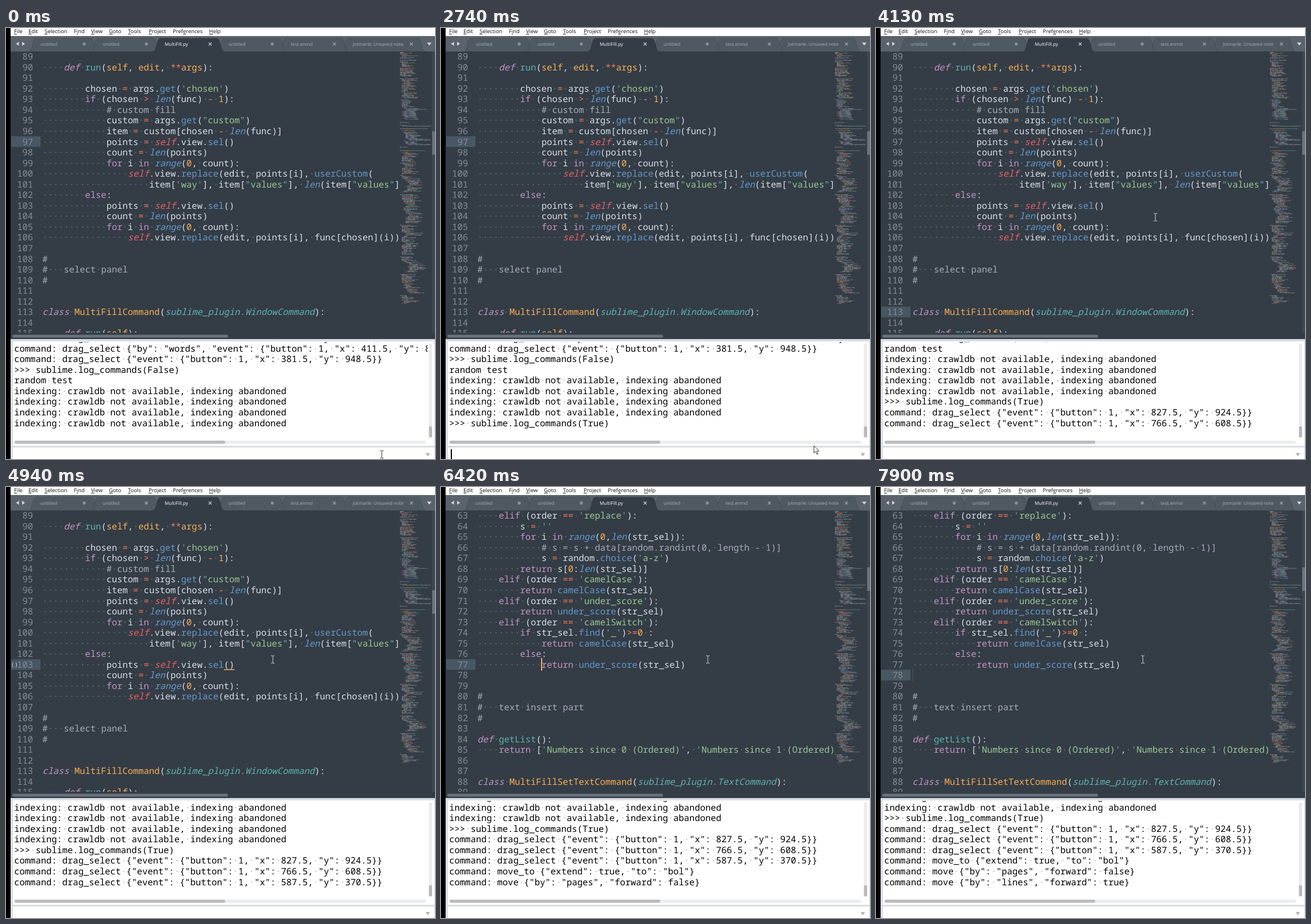
These frames come from a looping animation (746x751 px, 8 s). An HTML page:

```html
<!DOCTYPE html>
<html lang="en">
<head>
<meta charset="utf-8">
<title>Editor console log</title>
<style>
  html, body { margin: 0; width: 100%; height: 100%; overflow: hidden; background: #000; }
  svg { display: block; width: 746px; height: 751px; }
  text { white-space: pre; text-rendering: geometricPrecision; }
  .mono { font: 500 15.467px "Noto Sans Mono", "DejaVu Sans Mono", monospace; fill: #d8dee9; }
  .ui { font: 9.4px "Open Sans", "Noto Sans", sans-serif; fill: #111; }
  .tab { font-size: 8.1px; fill: #a9b1b9; }
  .console { fill: #000; }
  .map { fill: #d8dee9; opacity: .55; }
  .dot { fill: #68737e; }
  .console .dot { fill: #b4b4b4; }
  .number { fill: #848c96; text-anchor: end; }
  .note { fill: #a6acb9; }
  .str { fill: #99c794; }
  .quote { fill: #5fb3b3; }
  .key, .store { fill: #c594c5; }
  .self { fill: #ec5f67; }
  .built, .call { fill: #6699cc; }
  .num, .param, .cname { fill: #f9ae58; }
  .op { fill: #f97b58; }
  .fname, .base { fill: #5fb3b3; }
  .store, .self, .built, .base { font-style: italic; }
</style>
</head>
<body>
<svg id="stage" viewBox="0 0 746 751"></svg>
<script>
const LOOP = 8000, ADVANCE = 9.28, PITCH = 18.55;
const CODE_X = 63.3, LOG_X = 14.3;
const rowTop = row => 40.3 + row * PITCH;

const stage = document.getElementById('stage');
function el(parent, tag, attrs = {}, text) {
  const node = document.createElementNS('http://www.w3.org/2000/svg', tag);
  for (const name in attrs) node.setAttribute(name, attrs[name]);
  if (text !== undefined) node.textContent = text;
  return parent.appendChild(node);
}
const rect = (parent, x, y, width, height, fill, more) =>
  el(parent, 'rect', { x, y, width, height, fill, ...more });
const path = (parent, d, fill, more) => el(parent, 'path', { d, fill, ...more });
const show = (node, on) => node.setAttribute('visibility', on ? 'visible' : 'hidden');

function clipped(id, x, y, width, height) {
  rect(el(stage, 'clipPath', { id }), x, y, width, height);
  return el(stage, 'g', { 'clip-path': `url(#${id})` });
}

// Each token starts on its own column; spaces are shown as dots.
function textLine(parent, tokens, x, y) {
  const line = el(parent, 'text', { y });
  let col = 0;
  for (const [text, kind] of tokens) {
    for (const part of text.split(/( +)/).filter(Boolean)) {
      const blank = part[0] === ' ';
      el(line, 'tspan', { x: x + col * ADVANCE, class: blank ? 'dot' : kind },
        blank ? '·'.repeat(part.length) : part);
      col += part.length;
    }
  }
}

const SYNTAX = new RegExp([
  /(?<note>#.*)/, /(?<str>'[^']*'|"[^"]*")/, /(?<store>\b(?:def|class)\b)/,
  /(?<key>\b(?:if|elif|else|for|in|return)\b)/, /(?<self>\bself\b)/,
  /(?<built>\b(?:len|range)\b)/, /(?<num>\b\d+)/, /(?<op>[=<>+*-]+)/,
  /(?<call>\w+(?=\())/, /(?<word>\w+)/, /(?<other> +|.)/
].map(rule => rule.source).join('|'), 'g');
const IN_DEF = { call: 'fname', word: 'param', self: 'param' };
const IN_CLASS = { call: 'cname', word: 'base' };

function highlight(source) {
  const isClass = /^ *class /.test(source);
  const special = isClass ? IN_CLASS : /^ *def /.test(source) ? IN_DEF : {};
  return [...source.matchAll(SYNTAX)].flatMap(({ 0: text, groups }) => {
    const kind = Object.keys(groups).find(name => groups[name] !== undefined);
    if (kind === 'str')
      return [[text[0], 'quote'], [text.slice(1, -1), 'str'], [text[0], 'quote']];
    if (isClass && text === '.') return [[text, 'base']];
    return [[text, special[kind] || kind]];
  });
}

const LOWER_PAGE = `
    def run(self, edit, **args):

        chosen = args.get('chosen')
        if (chosen > len(func) - 1):
            # custom fill
            custom = args.get("custom")
            item = custom[chosen - len(func)]
            points = self.view.sel()
            count = len(points)
            for i in range(0, count):
                self.view.replace(edit, points[i], userCustom(
                    item['way'], item["values"], len(item["values"])))
        else:
            points = self.view.sel()
            count = len(points)
            for i in range(0, count):
                self.view.replace(edit, points[i], func[chosen](i))

#
#   select panel
#


class MultiFillCommand(sublime_plugin.WindowCommand):

    def run(self):`.split('\n');
const UPPER_PAGE = `    elif (order == 'replace'):
        s = ''
        for i in range(0,len(str_sel)):
            # s = s + data[random.randint(0, length - 1)]
            s = random.choice('a-z')
        return s[0:len(str_sel)]
    elif (order == 'camelCase'):
        return camelCase(str_sel)
    elif (order == 'under_score'):
        return under_score(str_sel)
    elif (order == 'camelSwitch'):
        if str_sel.find('_')>=0 :
            return camelCase(str_sel)
        else:
            return under_score(str_sel)


#
#   text insert part
#

def getList():
    return ['Numbers since 0 (Ordered)', 'Numbers since 1 (Ordered)']


class MultiFillSetTextCommand(sublime_plugin.TextCommand):
`.split('\n');

const drag = (x, y) => `command: drag_select {"event": {"button": 1, "x": ${x}, "y": ${y}}}`;
const LOG = [
  drag('411.5', '948.5'),
  'command: drag_select {"by": "words", "event": {"button": 1, "x": 411.5, "y": 848.5}}',
  drag('381.5', '948.5'),
  '>>> sublime.log_commands(False)',
  'random test',
  ...Array(4).fill('indexing: crawldb not available, indexing abandoned'),
  '>>> sublime.log_commands(True)',
  drag('827.5', '924.5'),
  drag('766.5', '608.5'),
  drag('587.5', '370.5'),
  'command: move_to {"extend": true, "to": "bol"}',
  'command: move {"by": "pages", "forward": false}',
  'command: move {"by": "lines", "forward": true}'
];
const LOG_TIMES = [1560, 2810, 3510, 4250, 5320, 6420, 7360];

// Window frame, menu and tabs
rect(stage, 0, 0, 746, 751, '#000');
rect(stage, 8, 0, 738, 14, '#fff');
const menu = { File: 14, Edit: 39, Selection: 67, Find: 118, View: 148, Goto: 179,
  Tools: 212, Project: 248, Preferences: 290, Help: 353 };
for (const [name, x] of Object.entries(menu)) {
  const item = el(stage, 'text', { x, y: 9.3, class: 'ui' });
  const key = { Find: 1, Preferences: 4 }[name] || 0;
  el(item, 'tspan', {}, name.slice(0, key));
  el(item, 'tspan', { 'text-decoration': 'underline' }, name[key]);
  el(item, 'tspan', {}, name.slice(key + 1));
}

rect(stage, 8, 14, 738, 27, '#5a636c');
const tabs = ['untitled', 'untitled', 'MultiFill.py', 'untitled', 'test.enmd', 'Jotmarle: Unsaved note'];
const tabEdges = [46, 154, 262, 373, 481, 589, 723];
function drawTab(i) {
  const x = tabEdges[i], end = tabEdges[i + 1], mark = end - 18, active = i === 2;
  path(stage, `M${x - 6} 41C${x} 41 ${x} 18 ${x + 6} 18H${end - 6}C${end} 18 ${end} 41 ${end + 6} 41Z`,
    active ? '#343d46' : '#4f5962', { stroke: active ? '#343d46' : '#444e57' });
  el(stage, 'text', { x: x + 14, y: 31, class: 'ui tab', style: active ? 'fill:#fff' : '' }, tabs[i]);
  if (tabs[i] === 'untitled') el(stage, 'circle', { cx: mark, cy: 28, r: 2.7, fill: '#87919a' });
  else path(stage, `M${mark - 2.5} 25.5l5 5m0 -5l-5 5`, 'none',
    { stroke: active ? '#c5cad0' : '#9aa3ab', 'stroke-width': 1.3 });
}
[0, 1, 5, 4, 3, 2].forEach(drawTab);
path(stage, 'M22.5 24v7l-5 -3.5ZM28 24v7l5 -3.5ZM732 25.5h8l-4 5Z', '#d3d8dd');

// Editor
rect(stage, 8, 41, 738, 502, '#343d46');
const editor = clipped('editor', 8, 41, 676, 490);
const gutter = rect(editor, 9, 0, 51, PITCH, '#475764');
const selection = rect(editor, 174.5, rowTop(14) + .2, 223, 18, '#4b5863', { stroke: '#7b8690', rx: 1.5 });

function drawPage(lines, first) {
  const page = el(editor, 'g', { class: 'mono' });
  lines.forEach((line, row) => {
    const y = rowTop(row) + 14.8;
    el(page, 'text', { x: 47, y, class: 'number' }, first + row);
    textLine(page, highlight(line), CODE_X, y);
  });
  return page;
}
const lowerPage = drawPage(LOWER_PAGE, 89);
const upperPage = drawPage(UPPER_PAGE, 63);

const bracketMark = el(editor, 'g');
el(bracketMark, 'text', { x: 8.5, y: 312.5, class: 'mono', style: 'font-size:10.5px' }, '()');
const underline = rect(bracketMark, 379, 317.6, 18.4, 1.4, '#f9ae58');

rect(stage, 11, 534.5, 375, 5, '#69737d', { rx: 2 });

// Minimap: the known lines in small, invented ones around them
const MAP_ADVANCE = .82, MAP_PITCH = 1.53, MAP_LINES = 287;
let seed = 7;
const random = () => (seed = seed * 16807 % 2147483647) / 2147483647;
const pick = list => list[Math.floor(random() * list.length)];
const knownLines = [...UPPER_PAGE.slice(0, -1), ...LOWER_PAGE];
const kinds = ['word', 'word', 'word', 'note', 'call', 'key', 'op', 'str', 'num'];
const blankLines = [9, 18, 29, 30, 54, 126, 140, 161, 162, 196, 197, 232, 233, 252, 253, 276, 277];
let indent = 0;
function inventLine(number) {
  if (blankLines.includes(number)) { indent = 0; return []; }
  const tokens = [[' '.repeat(indent * 4), 'other']];
  for (let left = 6 + random() * 26; left > 0;) {
    const length = 2 + Math.floor(random() * 7);
    tokens.push(['x'.repeat(length), pick(kinds)], [' ', 'other']);
    left -= length + 1;
  }
  indent = Math.max(number < 30 ? 0 : 1, Math.min(number < 30 ? 1 : 5, indent + pick([-1, 0, 0, 1])));
  return tokens;
}
const minimap = el(stage, 'g', { class: 'map' });
for (let number = 1; number <= MAP_LINES; number++) {
  const known = knownLines[number - 63];
  let x = 685;
  for (const [text, kind] of known === undefined ? inventLine(number) : highlight(known)) {
    const width = Math.min(text.length * MAP_ADVANCE, 739 - x);
    if (text.trim() && width > 0)
      el(minimap, 'rect', { x, y: 42 + (number - 1) * MAP_PITCH, width, height: .9, class: kind });
    x += text.length * MAP_ADVANCE;
  }
}
const minimapSelection = rect(stage, 695, 197.8, 18, 1.6, '#9aa5af', { opacity: .6 });
rect(stage, 741, 41, 5, 490, '#3d4750');
const thumb = rect(stage, 741, 180, 5, 41, '#69737d');

// Console
rect(stage, 8, 542, 738, 209, '#d9dce3');
rect(stage, 12, 546, 733, 182, '#fff');
rect(stage, 12, 731, 733, 20, '#fff');
rect(stage, 735.5, 550, 5.5, 164, '#ececec');
rect(stage, 735.5, 694, 5.5, 19, '#b9b9b9', { rx: 1.5 });
rect(stage, 15, 719, 715, 5.5, '#ececec', { rx: 2 });
rect(stage, 15, 719, 366, 5.5, '#bcbcbc', { rx: 2 });
path(stage, 'M729.5 740.5h8l-4 6Z', '#b5b5b5');
const consoleView = clipped('log', 12, 547, 721, 170);
const log = el(consoleView, 'g', { class: 'mono console' });
const logLines = LOG.map((line, i) => {
  const group = el(log, 'g');
  textLine(group, [[line, '']], LOG_X, 563.8 + (i - 1) * 18.53);
  return group;
});
const typed = el(stage, 'g', { class: 'mono console' });
textLine(typed, [['sublime.log_commands(True)', '']], 18, 747);

const caret = rect(stage, 0, 0, 2, 22, '#000');

// Pointer
const beam = path(stage, 'M-3 -6.5h2.2l.8 .8l.8 -.8h2.2M0 -6v12M-3 6.5h2.2l.8 -.8l.8 .8h2.2', 'none');
const arrow = path(stage, 'M0 0V12.5L3 9.8L5.2 14.8L7.2 13.9L5 9.1H9Z', '#fff', { stroke: '#222', 'stroke-width': .9 });

const POINTER = [[0, 653.5, 743], [2320, 653.5, 743], [2390, 652, 741], [2630, 652, 741],
  [2720, 648.5, 728], [2810, 648.5, 728], [3050, 686, 640], [3370, 602.5, 484.5], [3500, 602.5, 484.5],
  [3510, 606.5, 491], [3800, 606.5, 491], [4240, 464, 300.5], [LOOP, 464, 300.5]];
const CARETS = [[-850, 17, 734], [620, 258, 734], [1560, 17, 734],
  [3510, 554, rowTop(24) - 2], [4250, 396, rowTop(14) - 2], [5320, 174, rowTop(14) - 2],
  [6420, 174, rowTop(14) - 2], [7360, 63, rowTop(15) - 2]];
const ACTIVE_ROW = [[0, 8], [3510, 24], [4250, 14], [7360, 15]];

const latest = (list, t) => list.filter(entry => entry[0] <= t).pop();

function blink(age) {
  const phase = age % 1050;
  if (age >= 1050 && phase < 110) return phase / 110;
  return Math.max(0, Math.min(1, 1 - (phase - 380) / 180));
}

function pointerAt(t) {
  const i = Math.max(1, POINTER.findIndex(point => point[0] > t));
  const [t0, x0, y0] = POINTER[i - 1], [t1, x1, y1] = POINTER[i];
  const k = (t - t0) / (t1 - t0), eased = k * k * (3 - 2 * k);
  return [x0 + (x1 - x0) * eased, y0 + (y1 - y0) * eased];
}

function draw(t) {
  const paged = t >= 6420, selected = t >= 5320 && !paged;
  show(lowerPage, !paged);
  show(upperPage, paged);
  show(selection, selected);
  show(minimapSelection, selected);
  show(bracketMark, t >= 4800 && !paged);
  underline.setAttribute('fill', selected ? '#d8dee9' : '#f9ae58');
  thumb.setAttribute('y', paged ? 140 : 180);
  gutter.setAttribute('y', rowTop(latest(ACTIVE_ROW, t)[1]));

  const added = LOG_TIMES.filter(time => time <= t).length;
  const visible = LOG.length - LOG_TIMES.length + added;
  log.setAttribute('transform', `translate(0 ${-added * 18.53})`);
  logLines.forEach((line, i) => show(line, i < visible));
  show(typed, t >= 620 && t < 1560);

  const [start, x, y] = latest(CARETS, t);
  caret.setAttribute('x', x);
  caret.setAttribute('y', y);
  caret.setAttribute('fill', t < 3510 ? '#000' : '#f9ae58');
  caret.setAttribute('opacity', blink(t - start));

  const [px, py] = pointerAt(t);
  const isArrow = (py > 530 && py < 550) || (py > 700 && py < 738);
  show(arrow, isArrow);
  show(beam, !isArrow);
  beam.setAttribute('stroke', py < 542 ? '#cdd3da' : '#333');
  for (const shape of [arrow, beam]) shape.setAttribute('transform', `translate(${px} ${py})`);
}

const begin = performance.now();
function tick() {
  draw((performance.now() - begin) % LOOP);
  requestAnimationFrame(tick);
}
tick();
</script>
</body>
</html>
```
